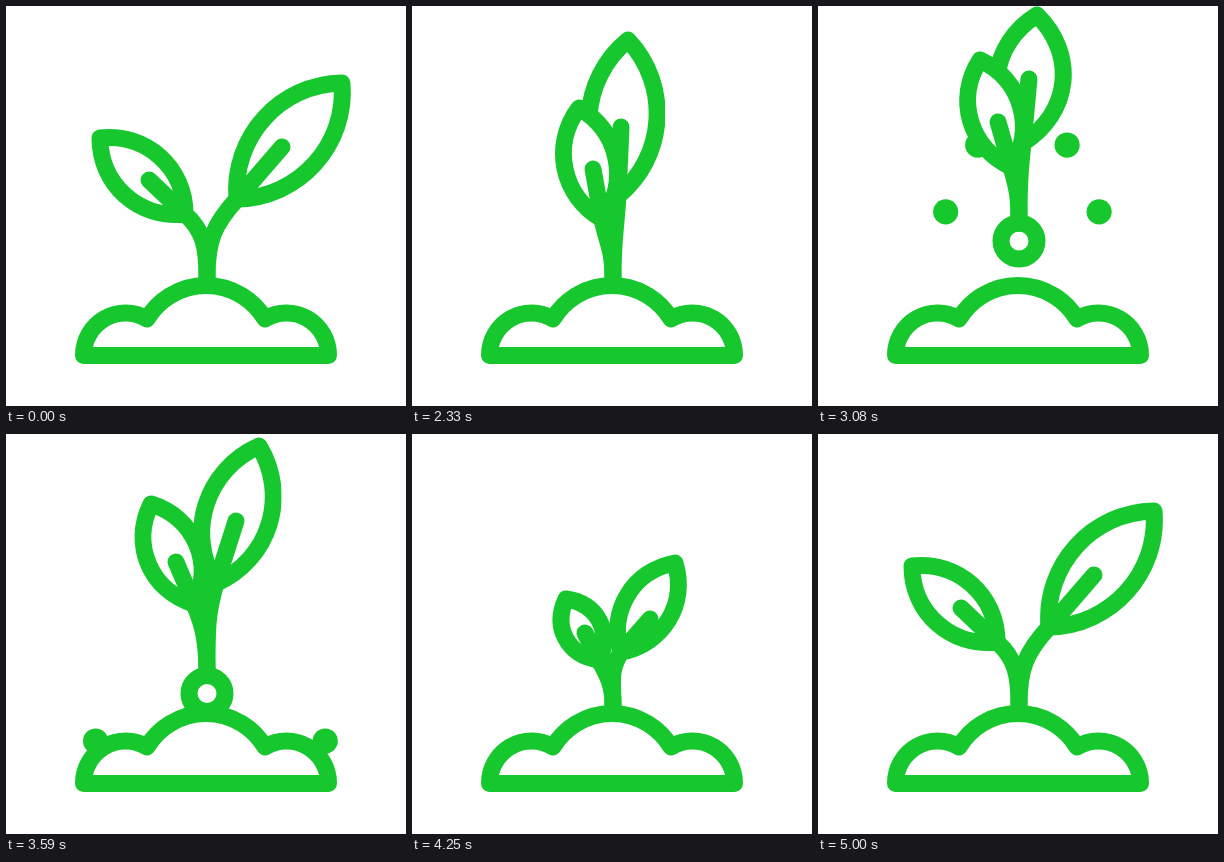
Animation of 400x400 px, one loop 5.03 s. Source, as an HTML page:

```html
<!DOCTYPE html>
<html lang="en">
<head>
<meta charset="utf-8">
<title>Sprout</title>
<style>
  html, body { margin: 0; width: 100%; height: 100%; overflow: hidden; background: #fefefe; }
  svg { display: block; width: 100vw; height: 100vh; }
  .line { fill: none; stroke: #16c72e; stroke-width: 17; stroke-linecap: round; stroke-linejoin: round; }
  .solid { fill: #fefefe; }
  .dot { fill: #16c72e; }
</style>
</head>
<body>
<svg viewBox="0 0 400 400">
  <defs><clipPath id="edge"><rect id="edgeRect" x="0" y="-50" width="400" height="500"/></clipPath></defs>
  <g id="dots"></g>
  <circle id="bulb" class="line" cx="201"/>
  <g clip-path="url(#edge)"><path id="rightLeaf" class="line solid"/></g>
  <path id="rightStem" class="line"/>
  <path id="leftLeaf" class="line solid"/>
  <path id="leftStem" class="line"/>
  <path class="line solid" d="M77.5 349.5A42 42 0 0 1 141 313A68.7 68.7 0 0 1 259 313A42 42 0 0 1 322.5 349.5Z"/>
</svg>
<script>
const LOOP = 5030, STEP = 30, START = 2030;
const ROOT = { x: 201, y: 271 };
const $ = id => document.getElementById(id);

// Leaf points are relative to the root: tip, vein end, leaf base; w is half the width.
const leaf = (w, tip, vein, base) => ({ w, pts: [tip, vein, base] });
const pose = (lift, edge, left, right) => ({ lift, edge, left, right });

const open = pose(0, 400,
  leaf(26, [-107, -139], [-58, -97], [-22, -63]),
  leaf(34, [135, -194], [75, -130], [30, -78]));
const closed = pose(0, 253,
  leaf(26, [-34, -169], [-20, -108], [-11, -58]),
  leaf(34, [15, -237], [8, -150], [5, -81]));
const hang = pose(54, 255,
  leaf(26, [-39, -163], [-21, -101], [-8, -56]),
  leaf(33, [18, -208], [10, -144], [4, -80]));
const drop = pose(29.5, 275.5,
  leaf(26, [-56, -171.5], [-31, -113.5], [-13, -71.5]),
  leaf(33, [52, -229.5], [29, -154.5], [9, -92]));
const squash = pose(0, 400,
  leaf(19, [-47, -106], [-28, -72], [-14, -45]),
  leaf(24, [62, -142], [37, -86], [8, -53]));

const linear = p => p;
const inOut = p => 0.5 - Math.cos(Math.PI * p) / 2;
const easeIn = p => p * p;
const easeOut = p => 1 - (1 - p) ** 2;

const mix = (a, b, p) => a + (b - a) * p;

// Swing a point around the root rather than along a straight line.
function swing(a, b, p) {
  const r = mix(Math.hypot(...a), Math.hypot(...b), p);
  const angle = mix(Math.atan2(a[1], a[0]), Math.atan2(b[1], b[0]), p);
  return [r * Math.cos(angle), r * Math.sin(angle)];
}

const mixLeaf = (a, b, p) => ({
  w: mix(a.w, b.w, p),
  pts: a.pts.map((pt, i) => swing(pt, b.pts[i], p))
});

const mixPose = (a, b, p) => ({
  lift: mix(a.lift, b.lift, p),
  edge: mix(a.edge, b.edge, p),
  left: mixLeaf(a.left, b.left, p),
  right: mixLeaf(a.right, b.right, p)
});

const land = { ...mixPose(drop, open, 0.25), lift: 0, edge: 400 };

const keys = [
  [2000, open, linear],
  [2330, closed, inOut],
  [3080, hang, linear],
  [3590, drop, easeIn],
  [3840, land, linear],
  [4250, squash, inOut],
  [5000, open, easeOut]
];

function poseAt(t) {
  const i = keys.findIndex(k => t < k[0]);
  if (i < 1) return open;
  const [t0, from] = keys[i - 1], [t1, to, ease] = keys[i];
  return mixPose(from, to, ease((t - t0) / (t1 - t0)));
}

function drawLeaf(side, { w, pts: [tip, vein, base] }, lift) {
  const dx = tip[0] - base[0], dy = tip[1] - base[1], len = Math.hypot(dx, dy);
  const at = ([x, y]) => `${(ROOT.x + x).toFixed(2)} ${(ROOT.y - lift + y).toFixed(2)}`;
  const local = (u, v) => at([base[0] + dx * u - dy / len * v, base[1] + dy * u + dx / len * v]);
  const h = w / 0.75;
  $(side + 'Leaf').setAttribute('d',
    `M${at(base)}C${local(0.27, h)} ${local(0.73, h)} ${at(tip)}` +
    `C${local(0.73, -h)} ${local(0.27, -h)} ${at(base)}Z`);
  $(side + 'Stem').setAttribute('d',
    `M${at([0, 0])}C${at([0, base[1] * 0.47])} ${local(-0.22, 0)} ${at(base)}L${at(vein)}`);
}

// Crumbs fly out in mirrored pairs.
const crumbs = [
  { from: 2570, life: 763, vx: 0.1504, vy: 0.466, g: 0.000667 },
  { from: 2755, life: 860, vx: 0.1375, vy: 0.688, g: 0.000877 }
].flatMap(c => [-1, 1].map(dir => {
  const el = document.createElementNS('http://www.w3.org/2000/svg', 'circle');
  el.setAttribute('class', 'dot');
  $('dots').append(el);
  return { ...c, dir, el };
}));

function drawCrumb({ from, life, vx, vy, g, dir, el }, t) {
  const age = t - from, alive = age > 0 && age < life;
  el.setAttribute('r', alive ? 12.6 : 0);
  el.setAttribute('cx', 204.4 + dir * vx * age);
  el.setAttribute('cy', 270 - vy * age + g * age * age);
}

function drawBulb(lift) {
  const size = Math.min(1, lift / 25), el = $('bulb');
  el.setAttribute('r', 18 * size);
  el.setAttribute('cy', ROOT.y - lift + 18 * size);
  el.style.strokeWidth = 17 * size;
}

function draw(t) {
  const p = poseAt(t);
  $('edgeRect').setAttribute('width', p.edge);
  drawLeaf('left', p.left, p.lift);
  drawLeaf('right', p.right, p.lift);
  drawBulb(p.lift);
  crumbs.forEach(c => drawCrumb(c, t));
}

const begin = performance.now();
function tick() {
  const t = (performance.now() - begin) % LOOP;
  draw(t < START ? 0 : START + Math.floor((t - START) / STEP) * STEP);
  requestAnimationFrame(tick);
}
tick();
</script>
</body>
</html>
```
